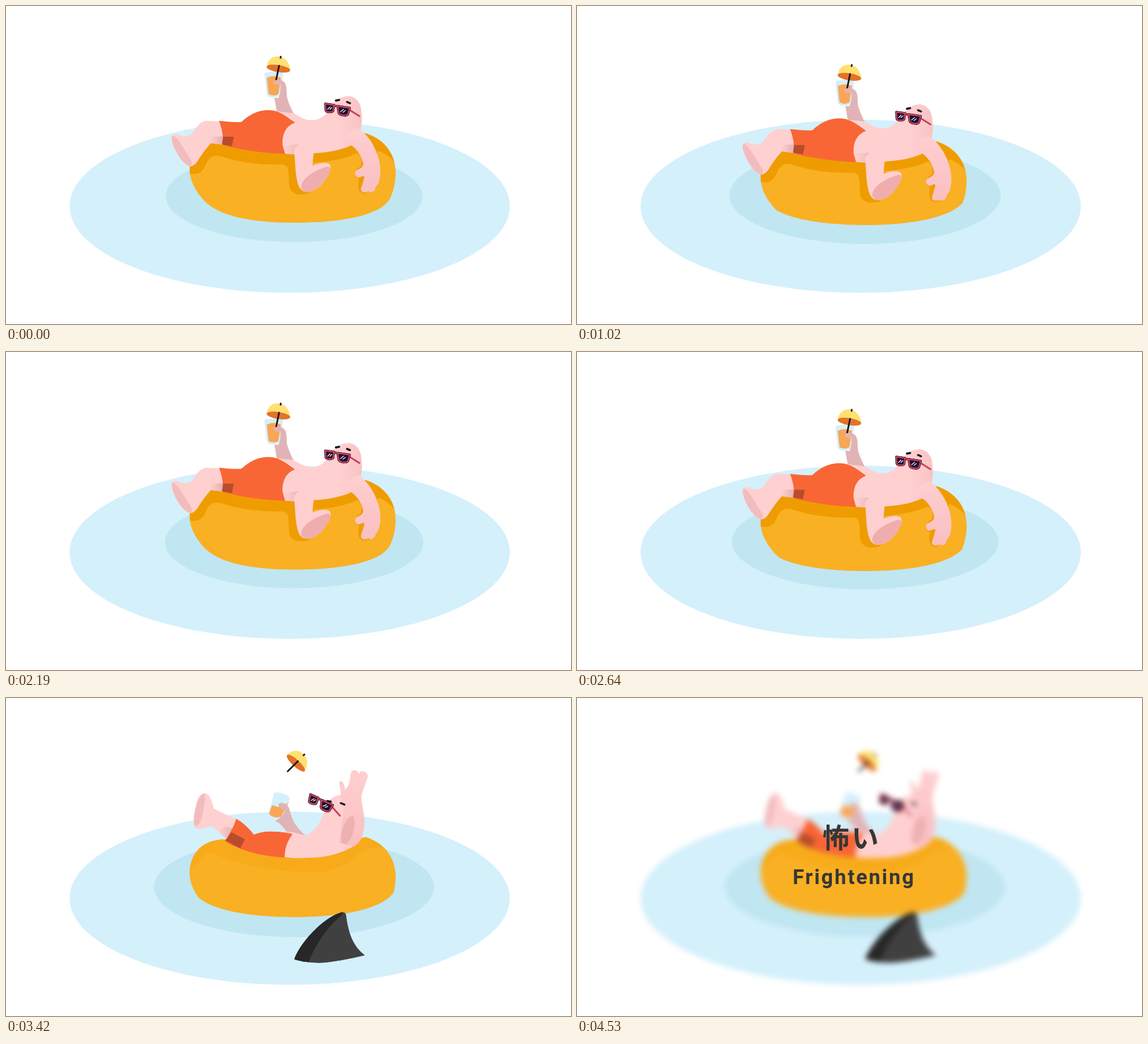
Write an HTML page that moves like this. It is 960 px wide and 540 px high and loops after 5.25 s.

```html
<!DOCTYPE html>
<html lang="en">
<head>
<meta charset="utf-8">
<title>Frightening</title>
<style>
  html, body { margin: 0; width: 100%; height: 100%; overflow: hidden; background: #fff; }
  svg { display: block; width: 100%; height: 100%; }
  text { fill: #363636; }
  .ja { font: 700 46px "Noto Sans CJK JP", "Noto Sans CJK", sans-serif; letter-spacing: 3.5px; }
  .en { font: 700 35px Roboto, sans-serif; letter-spacing: 2.6px; }
</style>
</head>
<body>
<svg viewBox="0 0 960 540">
  <defs>
    <linearGradient id="skin">
      <stop offset="0" stop-color="#ffd0d0"/>
      <stop offset=".72" stop-color="#ffd0d0"/>
      <stop offset="1" stop-color="#f9c2c4"/>
    </linearGradient>
    <linearGradient id="armSkin" x2="0" y2="1">
      <stop offset="0" stop-color="#ffcfd0"/>
      <stop offset="1" stop-color="#f9bfc1"/>
    </linearGradient>
    <linearGradient id="thigh">
      <stop offset="0" stop-color="#e9b3b4" stop-opacity="0"/>
      <stop offset="1" stop-color="#e2adaf"/>
    </linearGradient>
    <clipPath id="ringClip">
      <path id="ringEdge" d="M312 277C312 248 330 220 372 220L490 247L611 216C645 227 662 253 662 283C662 300 658 316 652 328C635 356 570 368 490 368C410 368 360 355 336 330C320 312 312 295 312 277Z"/>
    </clipPath>
    <clipPath id="ringWater">
      <path d="M300 150L300 300L318 328C335 359 410 372 490 372C570 372 645 359 662 325L675 300L675 150Z"/>
    </clipPath>
    <clipPath id="finWater">
      <path d="M480 350L620 350L610 437C585 443 555 449 533 450C515 450 500 447 490 444Z"/>
    </clipPath>
  </defs>

  <g id="scene">
    <ellipse cx="482" cy="340" rx="374" ry="147" fill="#d4f0fb"/>
    <ellipse id="ripple" cx="489.5" fill="#c0e6f2"/>
    <g clip-path="url(#ringWater)">
      <use href="#ringEdge" fill="#f9b023"/>
      <path id="ringShade" fill="#ef9c00" clip-path="url(#ringClip)"/>
    </g>

    <path id="glass" fill="#d4f0fb"/>
    <path id="juice" fill="#f9a656"/>
    <g id="umbrella">
      <path d="M-20-3C-16-28 18-25 20 4Z" fill="#ffe072"/>
      <ellipse cy=".8" rx="20.2" ry="6" transform="rotate(9)" fill="#e27328"/>
      <path d="M-4 20L1-4M3.400-17.500L4-19.500" stroke="#1b1320" stroke-width="2.800" stroke-linecap="round"/>
    </g>
    <path id="farArm" fill="#e2b3b6"/>

    <path id="torso" fill="url(#skin)"/>
    <path id="leg" fill="#ffd0d0"/>
    <path id="legShade" fill="url(#thigh)"/>
    <path id="sole" fill="#f1bcbe"/>
    <path id="trunks" fill="#f86635"/>
    <path id="trunkShade" fill="#b84c2b"/>

    <g id="nearLeg">
      <path d="M471 237L498 235C490 240 488 246 490 252L474 251Z" fill="url(#thigh)" opacity=".7"/>
      <path d="M497 235L523 248C522 258 521 265 521 271C530 267 545 264 550 269C555 277 547 291 537 302C527 314 512 319 503 313C496 308 494 296 492 280L490 250Z" fill="#ffcfd0"/>
      <path d="M502 304C504 294 520 280 545 273C551 272 553 277 550 283C546 292 540 299 533 306C524 315 512 317 506 314C502 311 501 308 502 304Z" fill="#f0adae"/>
    </g>

    <path id="arm" fill="url(#armSkin)"/>
    <path id="armShade" fill="#eeb0b1" d="M570 240C568 225 578 200 590 200C596 210 590 240 578 248C573 249 570 246 570 240Z"/>
    <path id="brows" fill="none" stroke="#1b1320" stroke-width="3.500" stroke-linecap="round"/>
    <g id="shades" stroke-linejoin="round" stroke-linecap="round">
      <path d="M23 1.500L39 11.500" stroke="#c5455a" stroke-width="3"/>
      <path id="frame" d="M-19-9.500L-4.500-7.500L-5.500 2.500C-6.500 5.500-17 5.500-18 2.500ZM2-5.500L22.500-2.500L19.500 8C17.500 11.500 6 10.500 4 6.500ZM-4.500-6.500L2-5" fill="#1b1030" stroke="#3a123c" stroke-width="3.600"/>
      <use href="#frame"/>
      <path d="M-19-9.500L-4.500-7.500L-5.500 2.500C-6.500 5.500-17 5.500-18 2.500ZM2-5.500L22.500-2.500L19.500 8C17.500 11.500 6 10.500 4 6.500ZM-4.500-6.500L2-5" fill="none" stroke="#dd4a58" stroke-width="1.900"/>
      <path d="M-15 0L-11-4M-11 0L-8-3M7 4L12 0M11 5L15 2" stroke="#e8e4f4" stroke-width="1.500"/>
    </g>

    <g clip-path="url(#finWater)">
      <g id="fin">
        <path d="M490 443C500 415 540 372 570 364C575 363 578 366 578 370C582 400 590 422 610 437C585 443 555 449 533 450C515 450 500 447 490 444Z" fill="#404040"/>
        <path d="M490 443C500 415 540 372 570 364C573 363 573 365 569 370C545 390 525 420 514 449C503 448 495 446 490 444Z" fill="#272727"/>
      </g>
    </g>
  </g>

  <g id="caption">
    <text class="ja" x="417" y="254" lang="ja">怖い</text>
    <text class="en" x="366.500" y="316">Frightening</text>
  </g>
</svg>
<script>
const LOOP = 5250, STEP = 30;
const $ = id => document.getElementById(id);
const set = (id, attrs) => Object.entries(attrs).forEach(([k, v]) => $(id).setAttribute(k, v));
const lerp = (a, b, k) => a + (b - a) * k;
const progress = (t, from, to) => Math.min(1, Math.max(0, (t - from) / (to - from)));
const easeOut = k => 1 - (1 - k) ** 3;
const easeInOut = k => (1 - Math.cos(Math.PI * k)) / 2;

// Each part: [floating pose, scared pose]
const parts = {
  glass: [
    "M439 115C440 111 470 110 471 114L466 149C465 157 445 158 443 150Z",
    "M456 161C462 158 483 165 482 171L470 203C467 209 446 205 446 197Z"],
  juice: [
    "M443 122C450 118 460 118 467 122L463 149C460 153 449 153 446 149Z",
    "M452 182C462 184 468 190 481 176L468 200C464 205 450 203 447 196Z"],
  farArm: [
    "M460 179L456 156L463 156C466 148 467 142 466 133C460 135 454 132 455 128C460 123 472 125 475 133C478 141 476 148 478 157C481 167 485 175 489 183Z",
    "M478 228L465 213L457 209C463 206 470 200 474 191C468 189 462 184 463 180C468 176 478 179 481 187C484 197 486 204 490 212C496 221 502 227 508 233Z"],
  torso: [
    "M460 179L488 182C500 188 508 195 522 194C536 192 544 184 549 176C556 162 568 153 582 153C596 154 604 166 604 182C606 196 604 204 602 212L606 222C602 232 596 236 588 236C570 245 545 249 523 250L490 252L474 251L470 236C468 215 476 203 491 198C484 190 474 184 460 179Z",
    "M472 226L488 228C500 231 506 234 511 232C525 226 534 212 540 196C543 178 552 167 566 165C582 165 594 176 600 190C606 200 609 208 608 215L606 232C604 242 596 249 590 252C570 264 545 270 523 271L490 272L473 270L474 262C476 248 481 238 487 231C482 230 476 228 472 226Z"],
  leg: [
    "M368 196L340 195C328 197 324 206 316 217C308 222 300 223 294 219C286 215 280 220 281 227C285 245 298 265 308 271C316 275 323 268 327 261C334 250 340 242 348 233L372 236Z",
    "M391 206L353 188C350 175 346 162 338 162C330 161 324 172 323 182C321 190 318 202 319 215C320 222 327 223 333 222C340 221 344 218 348 218C358 222 365 230 374 238L384 235Z"],
  legShade: [
    "M368 221L350 222L345 233L370 236Z",
    "M388 222L374 218L360 226L374 239Z"],
  sole: [
    "M283 220C277 228 296 268 313 272C318 268 316 262 312 258C300 240 292 222 283 220Z",
    "M338 162C326 162 315 206 321 217C328 220 334 205 335 190C338 178 338 168 338 162Z"],
  trunks: [
    "M362 195C375 196 388 198 400 197C415 182 438 172 460 179C472 183 482 191 491 198C475 204 469 218 470 236L474 251C440 250 400 245 368 236C370 222 367 208 362 195Z",
    "M391 205C402 211 413 221 421 232C432 227 445 226 455 227C468 227 478 229 487 231C480 240 475 252 474 262L473 271C430 268 395 258 372 243C380 230 388 218 391 205Z"],
  trunkShade: [
    "M369 222L387 222L384 238L367 235Z",
    "M383 228L406 240L398 255L373 242Z"],
  arm: [
    "M598 207C618 220 634 248 636 276C637 294 632 305 628 307C628 315 620 319 616 314C612 318 603 318 603 311C605 303 608 296 609 290C605 286 603 293 597 291C591 287 592 280 598 278C604 275 607 272 607 268C604 256 598 244 586 236L572 220Z",
    "M592 252C603 243 610 228 609 208C608 190 603 178 604 165C608 152 612 142 615 133C614 124 602 120 599 130C598 119 585 119 585 134C584 145 580 152 576 156C575 140 567 138 566 144C568 156 570 160 568 168C575 180 575 195 572 205L566 246Z"],
  brows: [
    "M560.5 160.500L566 159.500M579.500 163L584.500 165",
    "M546 175L552 176M569 178.500L575 181"],
  ringShade: [
    "M300 200L300 285L316 285C328 286 335 282 340 268C346 254 356 252 368 256C400 267 440 270 468 269C477 270 480 274 480 285L481 305C483 318 495 323 515 318L522 266C555 264 580 258 596 250C604 254 605 264 603 272C590 280 590 290 600 294C596 310 600 320 612 319L632 246C645 250 653 257 664 270L664 200Z",
    "M300 220L300 300L316 290C322 285 330 275 340 265C348 262 356 266 368 271C400 282 440 290 468 293C480 294 490 295 495 295L505 296C510 296 515 296 520 296L535 296C555 294 580 280 590 273C595 268 600 265 603 262C606 260 610 260 612 259C614 258 618 256 620 255L632 254C645 255 653 265 664 280L664 220Z"]
};

const sinkKeys = [[480, 0], [1020, 14], [1320, 20], [1560, 17], [2070, 4], [2340, 0], [2640, 12], [2970, 20]];
const rippleKeys = [[480, 218], [1020, 230.5], [1320, 238], [1560, 233], [2190, 219.5], [2340, 218], [2640, 226.5], [3060, 238]];

// Smooth curve through keys, flat at its turning points
function curve(keys, t) {
  const last = keys.length - 1;
  if (t <= keys[0][0]) return keys[0][1];
  if (t >= keys[last][0]) return keys[last][1];
  const slope = i => {
    if (i === 0 || i === last) return 0;
    const [p, c, n] = [keys[i - 1], keys[i], keys[i + 1]];
    return (c[1] - p[1]) * (n[1] - c[1]) <= 0 ? 0 : (n[1] - p[1]) / (n[0] - p[0]);
  };
  const i = keys.findIndex(k => k[0] > t) - 1;
  const [t0, a] = keys[i], [t1, b] = keys[i + 1];
  const d = t1 - t0, k = (t - t0) / d, r = 1 - k;
  return r * r * (1 + 2 * k) * a + k * k * (3 - 2 * k) * b
    + d * k * r * (r * slope(i) - k * slope(i + 1));
}

const NUMBER = /-?\d+(\.\d+)?/g;
// Blends two paths; dy shifts only the first one
function morph([from, to], k, dy) {
  const ends = to.match(NUMBER);
  let i = 0;
  return from.replace(NUMBER, n => {
    const start = +n + (i % 2 ? dy : 0);
    return lerp(start, +ends[i++], k).toFixed(2);
  });
}

const place = (id, x, y, angle = 0) => set(id, { transform: `translate(${x} ${y}) rotate(${angle})` });

function draw(t) {
  const sink = curve(sinkKeys, t), rx = curve(rippleKeys, t);
  const scare = easeOut(progress(t, 3150, 3390));
  const rise = easeOut(progress(t, 2880, 3240));
  const blur = 5 * easeInOut(progress(t, 3510, 4230));

  set("ripple", { rx, ry: rx * 0.357, cy: lerp(323, 321, (rx - 218) / 20) });
  place("ringEdge", 0, sink);
  for (const id in parts) set(id, { d: morph(parts[id], scare, sink) });
  set("ringShade", { opacity: lerp(1, 0.25, scare) });
  set("armShade", { opacity: scare });

  place("umbrella", lerp(463, 493, scare), lerp(105.5 + sink, 110, scare), 33.5 * scare);
  place("shades", lerp(561.5, 533, scare), lerp(175.5 + sink, 178, scare), 16 * scare);
  set("nearLeg", {
    transform: `translate(500 ${240 + sink}) scale(${1 - scare}) translate(-500 -240)`
  });
  place("fin", 0, 95 * (1 - rise));

  $("scene").style.filter = blur > 0 ? `blur(${blur}px)` : "none";
  set("caption", { opacity: progress(t, 4230, 4530) });
}

const begin = performance.now();
function tick() {
  const t = (performance.now() - begin) % LOOP;
  draw(Math.floor(t / STEP) * STEP);
  requestAnimationFrame(tick);
}
tick();
</script>
</body>
</html>
```
